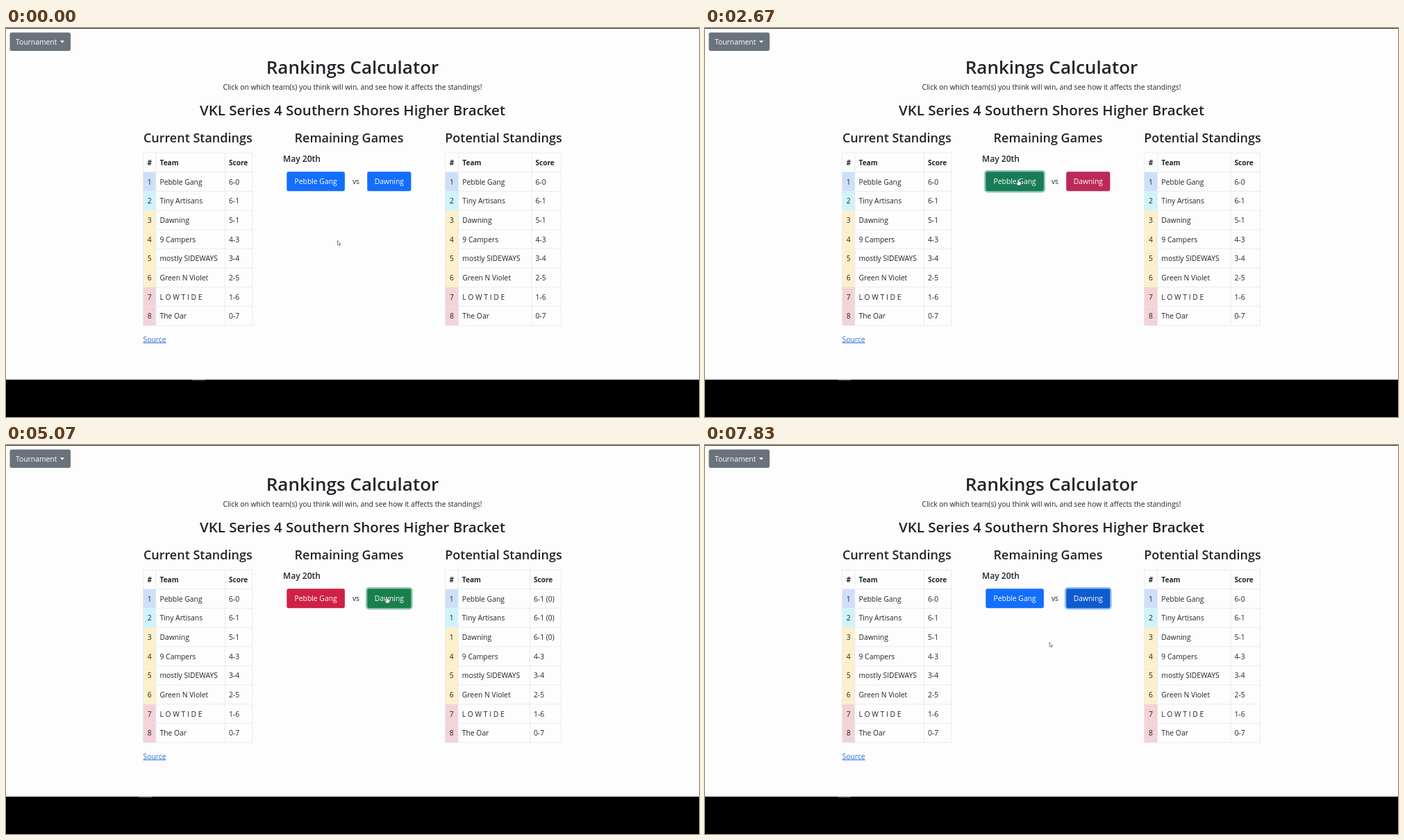
These frames come from a looping animation (998 px wide and 561 px high, 7.86 s). An HTML page:

```html
<!DOCTYPE html>
<html lang="en">
<head>
<meta charset="utf-8">
<title>Rankings Calculator</title>
<style>
html, body { margin: 0; width: 100%; height: 100%; overflow: hidden; background: #000; }
svg { display: block; width: 998px; height: 561px; }
text { font: 10.35px "Open Sans", "Noto Sans", sans-serif; fill: #212529; white-space: pre; }
.mid { text-anchor: middle; }
.semi { font-weight: 600; }
.bold { font-weight: 700; font-size: 10.1px; }
.white { fill: #fff; }
.link { fill: #2f6fdc; text-decoration: underline; }
.h1 { font-size: 26px; }
.h2 { font-size: 20.5px; }
.h3 { font-size: 18px; }
.h5 { font-size: 12.1px; }
.grid { fill: none; stroke: #e6e7e9; stroke-width: .8; }
</style>
</head>
<body>
<svg id="stage" viewBox="0 0 998 561"></svg>
<script>
const LOOP = 7860, FADE = 150;
const BLUE = [18, 110, 252], DARK = [15, 91, 208];
const GREEN = [25, 128, 72], RED = [212, 32, 65];
const RING_BLUE = [152, 193, 250], RING_GREEN = [150, 203, 178];

// Clicks: pick and clear the first team, then the second
const PICK_A = 2553, CLEAR_A = 3200, PICK_B = 4935, CLEAR_B = 6000, LAG = 125;

const teams = ["Pebble Gang", "Tiny Artisans", "Dawning", "9 Campers",
  "mostly SIDEWAYS", "Green N Violet", "L O W T I D E", "The Oar"];
const scores = ["6-0", "6-1", "5-1", "4-3", "3-4", "2-5", "1-6", "0-7"];
const ranks = [1, 2, 3, 4, 5, 6, 7, 8];
const outcomes = {
  none: { scores, ranks, shift: 0 },
  first: { scores: ["7-0", "6-1", "5-2", ...scores.slice(3)], ranks, shift: 0 },
  second: { scores: Array(3).fill("6-1 (0)").concat(scores.slice(3)), ranks: [1, 1, 1, 4, 5, 6, 7, 8], shift: 2.5 }
};
const zones = ["#cedffa", "#cef4fb", ...Array(4).fill("#fcf0cb"), "#f3d3d7", "#f3d3d7"];

const buttons = [
  { x: 404.3, w: 83.6, label: teams[0], focus: [PICK_A, PICK_B], pick: [PICK_A, CLEAR_A],
    fades: [[720, DARK], [PICK_A, GREEN], [CLEAR_A, DARK], [PICK_B, RED], [CLEAR_B, BLUE]] },
  { x: 520.2, w: 63.2, label: teams[2], focus: [PICK_B, LOOP], pick: [PICK_B, CLEAR_B],
    fades: [[PICK_A, RED], [CLEAR_A, BLUE], [3655, DARK], [PICK_B, GREEN], [CLEAR_B, DARK]] }
];

// Cursor moves: start, end, target x, target y
const home = [477.5, 306.5];
const moves = [[300, 880, 451, 218], [3500, 3770, 548.5, 219], [7200, 7750, 496, 284.5]];

const text = (x, y, s, cls = "") => `<text x="${x}" y="${y}" class="${cls}">${s}</text>`;
const rect = (x, y, w, h, fill, more = "") =>
  `<rect x="${x}" y="${y}" width="${w}" height="${h}" fill="${fill}" ${more}/>`;

function table(cols, { scores, ranks }) {
  const top = 180, step = 27.68, [left, a, b, right] = cols;
  const mid = (left + a) / 2;
  const bottom = top + 9 * step;
  let fills = "", words = "", lines = `M${left} ${top}H${right}V${bottom}H${left}ZM${a} ${top}V${bottom}M${b} ${top}V${bottom}`;
  const row = (y, cells, cls) => {
    words += text(mid, y, cells[0], cls + " mid") + text(a + 5.7, y, cells[1], cls) + text(b + 5.4, y, cells[2], cls);
  };
  row(198, ["#", "Team", "Score"], "bold");
  teams.forEach((team, i) => {
    const y = top + (i + 1) * step;
    fills += rect(left, y, a - left, step, zones[i]);
    lines += `M${a} ${y}H${right}`;
    row(y + 18, [ranks[i], team, scores[i]], "");
  });
  return `${fills}<path class="grid" d="${lines}"/>${words}`;
}

const button = ({ x, w, label }, i) =>
  rect(x - 1, 206.2, w + 2, 30, "none", `id="ring${i}" rx="3.5" stroke-width="2.6"`) +
  rect(x, 207.2, w, 28, "none", `id="btn${i}" rx="2.7"`) +
  text(x + w / 2, 225.3, label, "mid white");

const stage = document.getElementById("stage");
stage.innerHTML =
  rect(0, 0, 998, 507, "#fdfdfd") + rect(0, 0, 998, 1, "#2b2b2d") +
  rect(0, 507, 998, 1, "#1b2a30") + rect(0, 508, 998, 53, "#000") +
  rect(268, 507, 19, 1.5, "#59646a", 'id="tab"') +
  rect(5.5, 6.5, 87.5, 26.5, "#6a737b", 'rx="2.7"') +
  text(14, 23.8, "Tournament", "white") + '<path d="M77.8 18.2h6.4l-3.2 3.2z" fill="#fff"/>' +
  text(499, 66, "Rankings Calculator", "h1 semi mid") +
  text(499, 89, "Click on which team(s) you think will win, and see how it affects the standings!", "mid") +
  text(499, 125.5, "VKL Series 4 Southern Shores Higher Bracket", "h2 semi mid") +
  text(276.3, 165, "Current Standings", "h3 semi mid") +
  text(494, 165, "Remaining Games", "h3 semi mid") +
  text(716.5, 165, "Potential Standings", "h3 semi mid") +
  text(399, 193, "May 20th", "h5 semi") +
  table([197.5, 215.8, 315.5, 354.8], outcomes.none) +
  '<g id="potential"></g>' +
  text(197.5, 452.5, "Source", "link") +
  buttons.map(button).join("") + text(504, 225.3, "vs", "mid") +
  `<g id="cursor">
    <path id="arrow" d="M0 0V6.6L1.6 5.2L2.6 7.4L3.6 7L2.7 4.9H4.7Z" fill="#fff" stroke="#555" stroke-width=".7"/>
    <path id="hand" d="M-.8 .7Q0-.6.8.7V3.4L3.4 4Q4.2 4.3 4 5.4L3.3 9H-.8L-2.9 5.8Q-2.7 4.6-.8 6Z" fill="#fff" stroke="#234" stroke-width=".4"/>
  </g>`;

const get = id => document.getElementById(id);
const clamp = v => Math.min(1, Math.max(0, v));
const ease = v => v * v * (3 - 2 * v);
const mix = (a, b, k) => a.map((v, i) => v + (b[i] - v) * k);
const rgb = c => `rgb(${c.map(Math.round)})`;
const within = (t, [from, to]) => t >= from && t < to;

function pointer(t) {
  let pos = home;
  for (const [from, to, x, y] of moves) pos = mix(pos, [x, y], ease(clamp((t - from) / (to - from))));
  return pos;
}

let shown;
function showOutcome(name) {
  if (name === shown) return;
  shown = name;
  const o = outcomes[name];
  get("potential").innerHTML = table([632.5, 651.6 - o.shift / 5, 757 - o.shift, 799.5], o);
}

function draw(t) {
  buttons.forEach((b, i) => {
    const fill = b.fades.reduce((c, [at, to]) => mix(c, to, ease(clamp((t - at) / FADE))), BLUE);
    get("btn" + i).setAttribute("fill", rgb(fill));
    const ring = within(t, b.focus) ? rgb(within(t, b.pick) ? RING_GREEN : RING_BLUE) : "none";
    get("ring" + i).setAttribute("stroke", ring);
  });
  showOutcome(within(t, [PICK_A + LAG, CLEAR_A]) ? "first" : within(t, [PICK_B + LAG, CLEAR_B]) ? "second" : "none");

  const [x, y] = pointer(t);
  const over = y > 207 && y < 235.5 && buttons.some(b => x > b.x && x < b.x + b.w);
  get("cursor").setAttribute("transform", `translate(${x} ${y})`);
  get("hand").setAttribute("visibility", over ? "visible" : "hidden");
  get("arrow").setAttribute("visibility", over ? "hidden" : "visible");
  get("tab").setAttribute("x", t < 1630 ? 268 : 191.5);
}

function tick() {
  draw(performance.now() % LOOP);
  requestAnimationFrame(tick);
}
tick();
</script>
</body>
</html>
```
